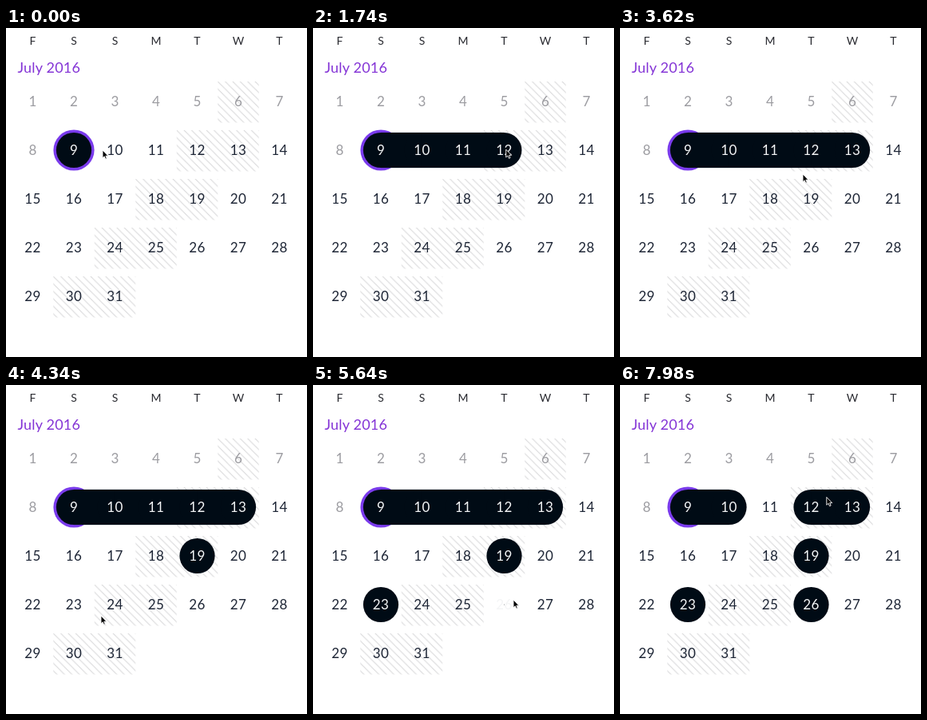
An HTML page that plays this animation: 377 by 412 pixels, repeating every 8 s.

```html
<!DOCTYPE html>
<html lang="en">
<head>
<meta charset="utf-8">
<title>Calendar selection</title>
<style>
  html, body { margin: 0; width: 100%; height: 100%; overflow: hidden; background: #fff; }
  svg { display: block; width: 377px; height: 412px; font-family: Lato, "Open Sans", sans-serif; }
  .weekdays { font-size: 14px; fill: #2a2b31; text-anchor: middle; }
  .month { font-size: 18px; fill: #8434d6; letter-spacing: .2px; }
  .days { font-size: 17px; text-anchor: middle; letter-spacing: .3px; }
</style>
</head>
<body>
<svg viewBox="0 0 377 412">
  <defs>
    <pattern id="hatch" width="9.36" height="9.36" patternUnits="userSpaceOnUse">
      <path d="M-1-1L10.36 10.36M-1 8.36L1 10.36M8.36-1L10.36 1" stroke="#d6d6d8"/>
    </pattern>
  </defs>
  <g class="weekdays"></g>
  <text class="month" x="14.5" y="55.5">July 2016</text>
  <g class="hatches" fill="url(#hatch)"></g>
  <circle class="today" r="25.6" fill="#7a3bec"/>
  <g class="marks" fill="#000b15"></g>
  <g class="days"></g>
  <path class="cursor" d="M0 0V9.8L2.2 7.8L3.7 11.2L5.3 10.5L3.9 7.2H6.9Z" stroke="#fff" stroke-width=".9"/>
</svg>
<script>
const LOOP = 8000, GROW = 110, RADIUS = 22.1, STEP = 51.5, TODAY = 9, LAST = 31;
const find = selector => document.querySelector(selector);

function set(node, attrs) {
  for (const key in attrs) node.setAttribute(key, attrs[key]);
}
function add(parent, tag, attrs, text = '') {
  const node = document.createElementNS('http://www.w3.org/2000/svg', tag);
  set(node, attrs);
  node.textContent = text;
  find(parent).append(node);
  return node;
}

const colX = col => 33.5 + STEP * col;
const dayX = day => colX((day - 1) % 7);
const dayY = day => 92 + 61 * Math.floor((day - 1) / 7);

// pointer stops; a stop with a day clicks it
const stops = [
  { at: 0, x: 121, y: 153 },
  { at: 420, x: 133, y: 152, day: 10 },
  { at: 1060, x: 183, y: 153, day: 11 },
  { at: 1640, x: 237, y: 152, day: 12 },
  { at: 2160, x: 285, y: 153, day: 13 },
  { at: 2900, x: 284, y: 188 },
  { at: 3620, x: 229, y: 183 },
  { at: 3880, x: 236, y: 213, day: 19 },
  { at: 4340, x: 119, y: 289 },
  { at: 4720, x: 85, y: 275, day: 23 },
  { at: 5640, x: 251, y: 269, day: 26 },
  { at: 6620, x: 166, y: 151 },
  { at: 6980, x: 184, y: 153, day: 11 },
  { at: 7640, x: 235, y: 198 },
  { at: LOOP, x: 259, y: 140 }
];

// day: [selected at, deselected at]
const clicks = { [TODAY]: [-LOOP] };
for (const { at, day } of stops) {
  if (day) (clicks[day] ||= []).push(at);
}

[...'FSSMTWT'].forEach((letter, i) =>
  add('.weekdays', 'text', { x: colX(i), y: 21.3 }, letter));

// every sixth day opens a hatched pair; the first is a single day
for (let day = 6; day < LAST; day += 6) {
  add('.hatches', 'rect', {
    transform: `translate(${dayX(day) - STEP / 2} ${dayY(day) - 25})`,
    width: STEP * Math.min(2, day - 5), height: STEP
  });
}

set(find('.today'), { cx: dayX(TODAY), cy: dayY(TODAY) });

const labels = {}, dots = {}, bridges = [];
for (let day = 1; day <= LAST; day++) {
  labels[day] = add('.days', 'text', { x: dayX(day), y: dayY(day) + 6 }, day);
  if (!clicks[day]) continue;
  dots[day] = add('.marks', 'circle', { cx: dayX(day), cy: dayY(day) });
  if (clicks[day + 1]) {
    bridges.push({ day, node: add('.marks', 'rect', { y: dayY(day) - RADIUS, height: RADIUS * 2 }) });
  }
}

const clamp = v => Math.max(0, Math.min(1, v));
const easeOut = v => 1 - (1 - v) ** 2;
const smooth = v => v * v * (3 - 2 * v);

function scaleOf(day, t) {
  const [on, off = Infinity] = clicks[day];
  return easeOut(clamp((t - on) / GROW)) * (1 - easeOut(clamp((t - off) / GROW)));
}

function isOn(day, t) {
  const [on, off = Infinity] = clicks[day] || [Infinity];
  return t >= on && t < off;
}

function render(t) {
  for (const day in labels) {
    set(labels[day], { fill: isOn(day, t) ? '#f4f5f6' : day < TODAY ? '#9c9ca1' : '#1e2636' });
  }
  for (const day in dots) set(dots[day], { r: RADIUS * scaleOf(day, t) });

  // each bridge grows out of the more settled neighbour
  for (const { day, node } of bridges) {
    const left = scaleOf(day, t), right = scaleOf(day + 1, t);
    const width = STEP * Math.min(left, right);
    set(node, { width, x: left >= right ? dayX(day) : dayX(day + 1) - width });
  }

  const next = stops.findIndex(stop => stop.at > t);
  const a = stops[next - 1], b = stops[next];
  const k = smooth((t - a.at) / (b.at - a.at));
  set(find('.cursor'), { transform: `translate(${a.x + (b.x - a.x) * k} ${a.y + (b.y - a.y) * k})` });
}

const start = performance.now();
function frame() {
  render(Math.max(0, performance.now() - start) % LOOP);
  requestAnimationFrame(frame);
}
frame();
</script>
</body>
</html>
```
